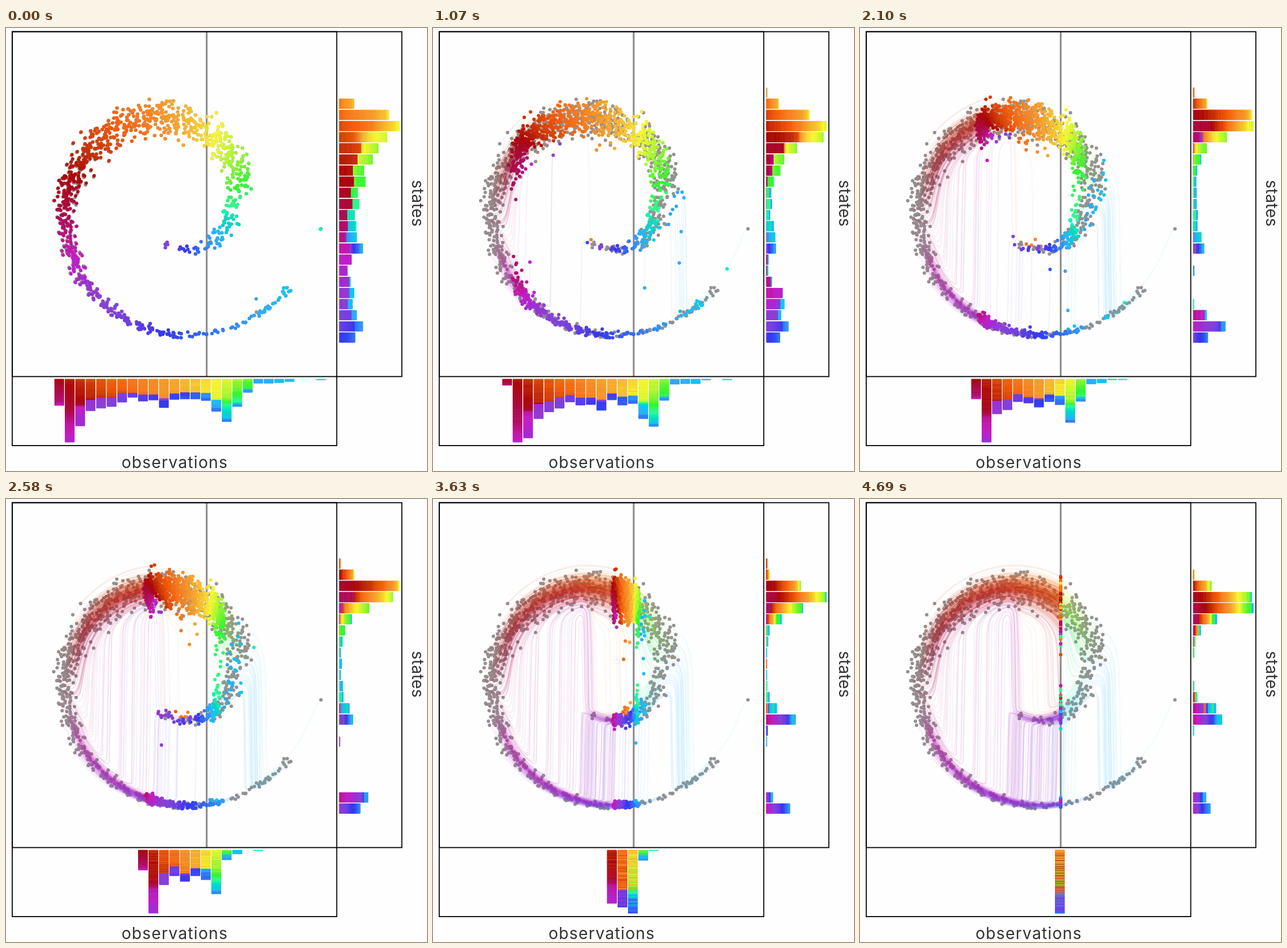
Write an HTML page with a canvas that moves like this. It is 730 by 767 pixels and loops after 4770 ms.

```html
<!DOCTYPE html>
<html lang="en">
<head>
<meta charset="utf-8">
<title>Conditional transport on a spiral</title>
<style>
  html, body { margin: 0; width: 100%; height: 100%; overflow: hidden; background: #fefefe; }
  canvas { display: block; }
</style>
</head>
<body>
<canvas id="stage" width="730" height="767"></canvas>
<script>
const ctx = document.getElementById('stage').getContext('2d');
const LOOP = 4770, COUNT = 1000, STEPS = 100, TARGET = 348;
const LEFT = 80, TOP = 80, CELL = 2, COLUMNS = 240, ROWS = 240;
const FIRST_TURN = -0.2, LAST_TURN = 4.9;

const mix = (a, b, f) => a + (b - a) * f;
const bell = (v, mean, sd) => Math.exp(-(((v - mean) / sd) ** 2) / 2);
const range = (n, make) => Array.from({ length: n }, (_, i) => make(i));

// Rainbow around the spiral, dark in the reds
function colorAt(x, y) {
  const a = (Math.atan2(y - 312, x - 330) * 180 / Math.PI + 360) % 360;
  const hue = 145 + a + 10 * Math.cos((a - 10) * Math.PI / 90)
    + 12 * bell(a, 205, 22) - 12 * bell(a, 150, 14);
  const saturation = 92 - 28 * bell(a, 140, 20);
  const lightness = 58 - 23 * bell(a, 187, 27) - 15 * bell(a, 25, 15);
  return `hsl(${hue}, ${saturation}%, ${lightness}%)`;
}

let seed = 7;
function random() {
  seed = (seed * 1664525 + 1013904223) % 4294967296;
  return seed / 4294967296;
}
const noise = () => (random() + random() + random() - 1.5) * 1.9;

// Archimedean spiral, measured in quarter turns, with density and spread along it
function spine(turn) {
  const angle = (1 - turn) * Math.PI / 2, radius = 72 + 38 * turn;
  return {
    x: 290 + radius * Math.cos(angle),
    y: 306 + radius * Math.sin(angle),
    spread: 2 + 14 * bell(turn, 1.9, 1),
    weight: bell(turn, 2.5, 1.1)
  };
}

function makePoint(turn) {
  const { x, y, spread } = spine(turn);
  const p = { x: x + spread * noise(), y: y + spread * noise() };
  return { ...p, color: colorAt(p.x, p.y) };
}

const points = [makePoint(LAST_TURN)];
while (points.length < COUNT) {
  const turn = mix(FIRST_TURN, 4.65, random());
  if (random() < spine(turn).weight) points.push(makePoint(turn));
}

const knots = range(256, k => spine(mix(FIRST_TURN, LAST_TURN, k / 255)));

// Cumulative distribution of y for a given x
function conditional(x) {
  const weighted = knots.map(k => ({ ...k, w: k.weight * bell(x, k.x, k.spread + 4) / (k.spread + 4) }));
  const peak = Math.max(...weighted.map(k => k.w));
  const active = weighted.filter(k => k.w > peak * 1e-5);
  const total = active.reduce((sum, k) => sum + k.w, 0);
  return y => active.reduce((sum, k) => sum + k.w / (1 + Math.exp(1.702 * (k.y - y) / k.spread)), 0) / total;
}

const levels = range(COLUMNS, c => {
  const cdf = conditional(LEFT + c * CELL);
  return range(ROWS, r => cdf(TOP + r * CELL));
});

function quantile(column, q) {
  let lo = 0, hi = ROWS - 1;
  while (hi - lo > 1) {
    const mid = (lo + hi) >> 1;
    if (column[mid] <= q) lo = mid; else hi = mid;
  }
  const f = (q - column[lo]) / (column[hi] - column[lo] || 1);
  return TOP + CELL * (lo + Math.min(1, Math.max(0, f)));
}

function yAt(x, q) {
  const at = (x - LEFT) / CELL, c = Math.floor(at);
  return mix(quantile(levels[c], q), quantile(levels[c + 1], q), at - c);
}

// Each point keeps its quantile while x slides to the observed value
for (const p of points) {
  const q = conditional(p.x)(p.y);
  p.path = range(STEPS + 1, k => k ? yAt(mix(p.x, TARGET, k / STEPS), q) : p.y);
}
const byX = [...points].sort((a, b) => a.x - b.x);

function progress(ms) {
  const t = Math.min(1, (ms + 30) / 4720), a = Math.PI * t;
  return t - 0.068 * Math.sin(2 * a) + 0.017 * Math.sin(a) + 0.007 * Math.sin(3 * a);
}

function dot(x, y, color) {
  ctx.fillStyle = color;
  ctx.beginPath();
  ctx.arc(x, y, 3, 0, 2 * Math.PI);
  ctx.fill();
}

// Stacks one slice per point and scales the fullest bin to the given length
function histogram(list, key, binSize, length, drawSlice) {
  const bins = [];
  for (const p of list) {
    const b = Math.max(0, Math.floor((p[key] - 84) / binSize));
    (bins[b] = bins[b] || []).push(p.color);
  }
  const unit = (length - 1.5) / Math.max(...Object.values(bins).map(b => b.length));
  bins.forEach((bin, b) => bin.forEach((color, i) => {
    ctx.fillStyle = color;
    drawSlice(84 + b * binSize, i * unit, unit + 1.5);
  }));
}

function label(text, x, y, angle, spacing) {
  ctx.save();
  ctx.translate(x, y);
  ctx.rotate(angle);
  ctx.font = '28px Inter, sans-serif';
  ctx.letterSpacing = spacing;
  ctx.textAlign = 'center';
  ctx.fillStyle = '#333';
  ctx.fillText(text, 0, 0);
  ctx.restore();
}

function draw(ms) {
  const s = progress(ms), step = Math.min(STEPS - 1, Math.floor(s * STEPS));
  ctx.fillStyle = '#fefefe';
  ctx.fillRect(0, 0, 730, 767);
  ctx.fillStyle = '#888';
  ctx.fillRect(346.5, 6, 3, 597);

  for (const p of points) dot(p.x, p.y, '#969090');

  ctx.lineWidth = 1.8;
  ctx.globalAlpha = 0.07;
  for (const p of points) {
    p.nowX = mix(p.x, TARGET, s);
    p.nowY = mix(p.path[step], p.path[step + 1], s * STEPS - step);
    ctx.strokeStyle = p.color;
    ctx.beginPath();
    for (let k = 0; k <= step; k++) ctx.lineTo(mix(p.x, TARGET, k / STEPS), p.path[k]);
    ctx.lineTo(p.nowX, p.nowY);
    ctx.stroke();
  }
  ctx.globalAlpha = 1;
  for (const p of points) dot(p.nowX, p.nowY, p.color);

  const byY = [...points].sort((a, b) => a.nowY - b.nowY);
  histogram(byY, 'nowX', 18.16, 110, (at, from, size) => ctx.fillRect(at, 607.5 + from, 16.5, size));
  histogram(byX, 'nowY', 19.27, 105, (at, from, size) => ctx.fillRect(577.5 + from, at, size, 17.3));

  ctx.strokeStyle = '#000';
  ctx.strokeRect(10.8, 6.4, 562.7, 716.6);
  ctx.strokeRect(10.8, 6.4, 675.6, 597.1);
  label('observations', 292.5, 761.5, 0, '1.1px');
  label('states', 704, 303.5, Math.PI / 2, '0.2px');
}

function tick() {
  draw(performance.now() % LOOP);
  requestAnimationFrame(tick);
}
tick();
</script>
</body>
</html>
```
